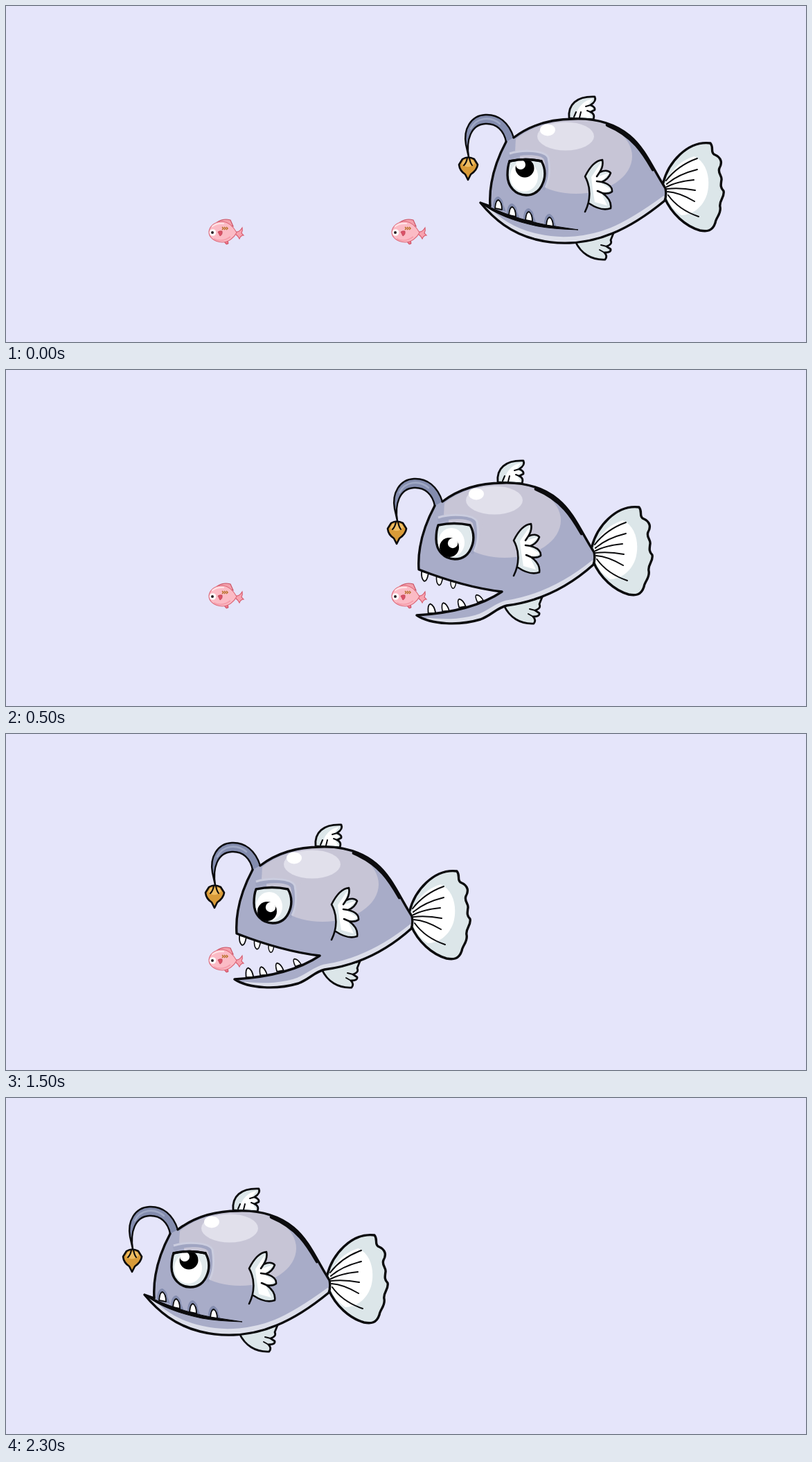
Write an HTML page that moves like this. It is 1155 px wide and 485 px high and loops after 2500 ms.

```html
<!DOCTYPE html>
<html lang="en">
<head>
<meta charset="utf-8">
<title>Hungry anglerfish</title>
<style>
  html, body { margin: 0; width: 100%; height: 100%; overflow: hidden; background: #e5e5fa; }
  svg { display: block; width: 1155px; height: 485px; }
  .ink { fill: none; stroke: #0b0b0d; stroke-width: 3.4; stroke-linecap: round; stroke-linejoin: round; }
  .thin { fill: none; stroke: #0b0b0d; stroke-width: 2; stroke-linecap: round; }
  .fin { fill: #dce6e9; }
  .white { fill: #fff; }
  .skin { fill: #a8acc8; }
  .dark { fill: #838cae; }
  .tooth { fill: #fff; stroke: #0b0b0d; stroke-width: 1.8; stroke-linejoin: round; }
</style>
</head>
<body>
<svg viewBox="0 0 1155 485">
  <defs>
    <path id="shutBody" d="M733 190C758 171 788 163 820 163C850 162 878 169 900 187C923 206 934 235 952 263Q954 273 951 281C929 299 903 317 876 328C840 343 801 346 765 337C729 328 705 308 685 284L699 289C697 258 706 226 722 196"/>
    <path id="openBody" d="M733 190C758 171 788 163 820 163C850 162 878 169 900 187C923 206 934 235 952 263Q954 273 951 281C922 307 880 333 826 340C812 343 804 354 788 360C758 369 717 368 696 354C746 351 788 341 819 320C776 315 735 302 699 288C697 258 706 226 722 196"/>
    <clipPath id="shutClip"><use href="#shutBody"/></clipPath>
    <clipPath id="openClip"><use href="#openBody"/></clipPath>

    <g id="backFins">
      <path class="ink" style="fill:#dce6e9" d="M948 259C955 225 985 194 1017 198C1022 204 1017 210 1022 214C1034 219 1034 227 1030 234C1027 241 1034 245 1033 251C1032 258 1031 262 1036 267C1038 276 1029 281 1031 290C1033 300 1025 305 1024 313C1020 325 1012 326 1002 324C981 318 961 300 951 277Z"/>
      <path class="white" d="M951 262C956 242 970 224 994 217C1012 226 1018 250 1012 272C1006 291 990 302 975 302C963 294 956 284 953 273Z"/>
      <path class="thin" d="M953 252Q970 230 998 220M954 257Q970 243 998 236M954 261Q970 253 993 251M954 264Q974 262 995 266M955 268Q972 269 994 282M956 273Q971 294 1000 304"/>
      <path class="ink" style="fill:#dce6e9;stroke-width:2.8" d="M813 162C811 142 824 130 850 131Q853 137 844 143Q851 146 850 150L844 153Q851 156 848 164Z"/>
      <path class="white" d="M823 160C824 147 834 136 847 134L840 143L847 148L841 153L846 161Z"/>
      <path class="thin" d="M820 160L823 153M828 161L830 153M844 143L837 145M844 153L839 151"/>
      <path class="ink" style="fill:#dce6e9;stroke-width:2.8" d="M822 340C830 357 845 367 865 366Q869 361 864 356Q874 356 873 351L867 347Q876 344 873 338L877 328Z"/>
      <path class="thin" d="M864 356L857 352M867 347L859 345"/>
    </g>

    <g id="lure">
      <path class="dark" d="M733 190C726 168 711 156 692 157C671 158 660 178 664 200L668 218C664 194 671 171 692 170C708 169 719 180 722 198Z"/>
      <path d="M671 177C679 161 699 158 713 170" fill="none" stroke="#a0a9c5" stroke-width="2.6" stroke-linecap="round"/>
      <path class="ink" style="stroke-width:2.4" d="M733 190C726 168 711 156 692 157C671 158 660 178 664 200L668 218C664 194 671 171 692 170C708 169 719 180 722 196"/>
      <path class="ink" style="fill:#d99b38;stroke-width:2.6" d="M659 221Q667 216 676 221L681 229Q680 237 671 243L667 251L663 243Q655 238 654 229Z"/>
      <path d="M658 228Q667 237 677 227L674 222H661Z" fill="#efbd62"/>
      <path class="thin" d="M666 219Q665 226 661 230M669 219Q670 226 673 230"/>
    </g>

    <g id="shade">
      <ellipse cx="823" cy="217" rx="81" ry="54" fill="#c7c5d6"/>
      <path d="M736 192C750 180 773 170 800 166L788 240L735 209Z" fill="#c7c5d6"/>
      <ellipse cx="808" cy="188" rx="41" ry="20.5" fill="#e1e0eb"/>
      <ellipse class="white" cx="782" cy="179" rx="11" ry="8.5"/>
      <path d="M727 218C746 209 776 211 780 221C784 236 781 253 775 265" fill="none" stroke="#a0a5c2" stroke-width="6"/>
      <path d="M727 213C746 207 778 208 783 219C786 236 785 250 779 262" fill="none" stroke="#cbcddf" stroke-width="3"/>
    </g>

    <g id="sideFin">
      <path class="fin" d="M836 246C842 234 851 223 861 222Q863 231 857 240Q868 235 873 241Q870 250 860 254Q876 258 875 268Q870 272 861 270Q875 280 873 292C862 296 851 291 842 285Q845 264 836 246"/>
      <path class="white" d="M845 247L859 226L855 246L871 241L858 255L874 265L860 271L868 288L850 283L847 264Z"/>
      <path class="ink" style="stroke-width:2.6" d="M842 285C851 291 862 296 873 292Q875 280 861 270Q870 272 875 268Q876 258 860 254Q870 250 873 241Q868 235 857 240Q863 231 861 222C851 223 842 234 836 246C845 262 844 281 836 297M860 254L853 253M861 270L854 267M857 240L853 246"/>
    </g>

    <path id="eye" d="M727 224Q750 219 773 224Q780 236 777 250C773 265 764 273 751 273C736 273 724 261 724 244Q724 232 727 224Z"/>
    <path id="back" class="ink" style="stroke-width:4.6" d="M868 172C906 188 920 212 934 236"/>
    <path id="tooth" d="M-5-1Q-4-13 0-13Q5-10 5 1Z"/>
    <path id="gum" class="dark" d="M-8-2C-8-14-4-18 0-18Q7-14 7-6L11 4Z"/>

    <g id="prey">
      <path d="M305 312Q314 306 324 309L328 318Z" fill="#f3a0ac" stroke="#c94f61" stroke-width="1.1"/>
      <path d="M331 326Q337 327 341 320Q342 324 340 328L343 331Q339 331 337 336Q335 332 331 329Z" fill="#f7a3b0" stroke="#d7596b" stroke-width="1.1"/>
      <path d="M314 339L318 344L321 343L320 338Z" fill="#ed7387" stroke="#c94f61"/>
      <path d="M293 326C294 317 302 311 313 311C323 312 329 320 333 327C329 335 321 341 312 341C300 340 293 334 293 326Z" fill="#fbbbc5" stroke="#de6b7b" stroke-width="1.2"/>
      <path d="M298 318Q304 313 314 314" fill="none" stroke="#ffe1e5" stroke-width="2.2" stroke-linecap="round"/>
      <path d="M300 336Q312 342 324 333" fill="none" stroke="#f59dab" stroke-width="1.8"/>
      <circle cx="298.5" cy="327" r="4.8" fill="#fff"/>
      <circle cx="298" cy="327" r="2" fill="#292126"/>
      <path d="M306 326Q309 324 312 325Q313 330 309 332Z" fill="#dc5268" stroke="#b93f50" stroke-width=".7"/>
      <path d="M312 319l2 2-2 2M315 319l2 2-2 2M318 319l2 2-2 2" fill="none" stroke="#b97027" stroke-width="1.5"/>
    </g>
  </defs>

  <g id="fish">
    <use href="#backFins"/>
    <use href="#lure"/>
    <g id="shut">
      <use class="skin" href="#shutBody"/>
      <g clip-path="url(#shutClip)">
        <use href="#shade"/>
        <path d="M690 288C709 310 735 326 768 333C802 341 842 337 874 324C903 312 930 293 952 277" fill="none" stroke="#dcdeea" stroke-width="8"/>
      </g>
      <use class="ink" href="#shutBody"/>
      <g id="shutTeeth"></g>
      <path d="M684 283C712 298 745 309 780 316L826 323Q790 322 768 318C735 311 706 301 684 283Z" fill="#0b0b0d" stroke="#0b0b0d"/>
      <use class="ink" style="fill:#e0e9ec" href="#eye"/>
      <ellipse class="white" cx="748" cy="246" rx="20" ry="22"/>
      <circle cx="749" cy="234" r="13.5"/>
      <circle class="white" cx="743" cy="229" r="7"/>
      <path class="ink" d="M727 224Q750 219 773 224"/>
    </g>
    <g id="open">
      <use class="skin" href="#openBody"/>
      <g clip-path="url(#openClip)">
        <use href="#shade"/>
        <path d="M710 361C740 365 770 362 788 355C804 348 811 340 826 336C878 328 920 303 952 277" fill="none" stroke="#dcdeea" stroke-width="7"/>
      </g>
      <g id="openTeeth"></g>
      <use class="ink" href="#openBody"/>
      <use class="ink" style="fill:#e0e9ec" href="#eye"/>
      <ellipse class="white" cx="746" cy="249" rx="19" ry="21"/>
      <circle cx="743" cy="256" r="14"/>
      <circle class="white" cx="748" cy="250" r="7.2"/>
    </g>
    <use href="#back"/>
    <use href="#sideFin"/>
  </g>
  <use id="nearPrey" href="#prey" x="264"/>
  <use id="farPrey" href="#prey"/>
</svg>
<script>
  const $ = id => document.getElementById(id);
  const STEP = 500;
  // Fish offset, mouth open, prey still left
  const steps = [
    [0, false, 2],
    [-103, true, 2],
    [-264, false, 1],
    [-366, true, 1],
    [-485, false, 0]
  ];

  const place = (shape, x, y, turn = 0, size = 1) =>
    `<use href="#${shape}" transform="translate(${x} ${y}) rotate(${turn}) scale(${size})"/>`;
  const tooth = (...at) => `<g class="tooth">${place("tooth", ...at)}</g>`;

  $("shutTeeth").innerHTML = [[711, 293], [731, 303], [755, 310], [785, 318]]
    .map(([x, y]) => place("gum", x, y) + tooth(x, y)).join("");

  const upper = [[708, 292, 185, 1], [729, 299, 185, .9], [749, 305, 185, .8]];
  const lower = [[718, 351, -10, 1.05], [738, 348, -16, .95], [762, 342, -22, .95], [788, 334, -32, .85]];
  $("openTeeth").innerHTML = [...upper, ...lower].map(at => tooth(...at)).join("");

  const show = (id, on) => $(id).setAttribute("display", on ? "inline" : "none");

  function draw(time) {
    const [x, open, prey] = steps[Math.floor(time / STEP) % steps.length];
    $("fish").setAttribute("transform", `translate(${x} 0)`);
    show("shut", !open);
    show("open", open);
    show("nearPrey", prey > 1);
    show("farPrey", prey > 0);
  }

  const start = performance.now();
  function tick() {
    draw(performance.now() - start);
    requestAnimationFrame(tick);
  }
  tick();
</script>
</body>
</html>
```
